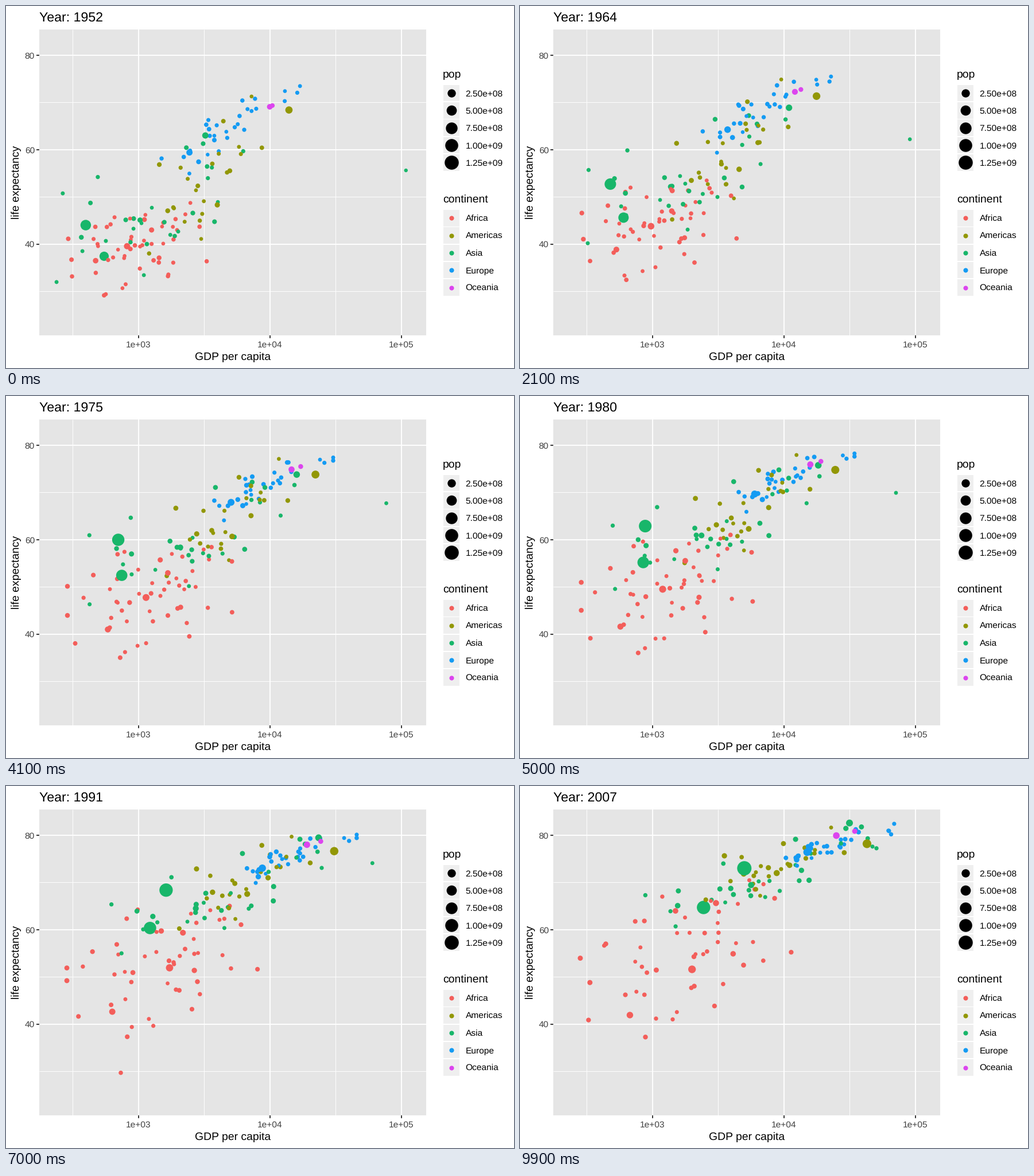
Recreate the animation shown at these times as a matplotlib script. Size 885 by 632 pixels, loop 10000 ms.

```python
import numpy as np
import matplotlib.pyplot as plt
from matplotlib.animation import FuncAnimation
from matplotlib.patches import Rectangle

W, H, DPI = 885, 632, 100
FRAMES, STEPS = 100, 11
PT = W / 504  # pixels per typographic point
LEFT, RIGHT, TOP, BOTTOM = 58, 732, 40.5, 575

plt.rcParams["font.family"] = "Liberation Sans"
plt.rcParams["text.hinting"] = "none"

COLORS = {"Africa": "#F35E5A", "Americas": "#929705", "Asia": "#18B66A",
          "Europe": "#149BF3", "Oceania": "#DC45EE"}

rng = np.random.default_rng(7)
T = np.linspace(0, 1, STEPS + 1)[:, None]  # one row per five years
EASED = 1 - (1 - T) ** 1.5                 # life gains slow down


def lerp(ends, t=T):
    return ends[0] + (ends[1] - ends[0]) * t


def px(logx):
    return 230.5 + 229 * (logx - 3)


def py(life):
    return 86 + 8.2375 * (80 - life)


def scale(pop):
    """Bubble size, its area growing with population in millions."""
    return 1 + 5 * np.sqrt(np.clip(pop / 1319, 0, 1))


def area(size):
    diameter = (0.75 * (size * 2.845 + 0.945) + 0.7) * PT
    return (diameter * 72 / DPI) ** 2


def normal(a):
    return (a - a.mean(axis=-1, keepdims=True)) / a.std(axis=-1, keepdims=True)


def walk(n):
    """Standardised scores for n bubbles that wander slowly from step to step."""
    moves = rng.normal(0, 0.1, (STEPS + 1, n))
    moves[0] = normal(rng.normal(size=n))
    return np.clip(normal(moves.cumsum(axis=0)), -1.9, 2)


def cap(life):
    """Bend the richest lives smoothly under a rising ceiling."""
    return life - 1.5 * np.logaddexp(0, (life - lerp((73.5, 83))) / 1.5)


def cloud(name, n, income, spread, life, slope, noise):
    """Bubbles scattered around a moving line; each pair is first and last year."""
    dx = lerp(spread) * walk(n)
    y = lerp(life, EASED) + lerp(slope) * dx + lerp(noise) * walk(n)
    pop = np.clip(10 ** rng.normal(1, 0.5, n), 0.4, 190) * lerp((0.43, 1))
    return lerp(income) + dx, cap(y), pop, [COLORS[name]] * n


def bubble(name, pop, income, life, bend=1, shock=0):
    """One standout; bend shapes the income path, shock is a brief loss of life."""
    dip = shock * np.maximum(0, 1 - abs(T - 8 / STEPS) * STEPS)
    return (lerp(income, T ** bend), lerp(life, EASED) - dip, lerp(pop),
            [COLORS[name]])


parts = [
    cloud("Africa", 51, (2.98, 3.25), (.27, .42), (39.3, 55), (6, 11), (4.6, 7.6)),
    cloud("Americas", 24, (3.5, 3.92), (.22, .27), (53, 73.4), (24, 9), (6, 2.8)),
    cloud("Asia", 29, (3.1, 3.84), (.38, .47), (46.5, 71), (13, 10), (6.5, 3)),
    cloud("Europe", 30, (3.69, 4.36), (.27, .24), (65, 77.9), (17, 8), (2.6, 1.2)),
    cloud("Oceania", 2, (4.01, 4.47), (.01, .07), (69.3, 80.7), (14, 8), (0, 0)),
    bubble("Asia", (556, 1319), (2.6, 3.7), (44, 73), bend=1.7),
    bubble("Asia", (372, 1110), (2.74, 3.39), (37.4, 64.7), bend=1.8),
    bubble("Americas", (157, 301), (4.146, 4.633), (68.4, 78.2)),
    bubble("Asia", (86, 127), (3.51, 4.5), (63, 82.6), bend=0.4),
    bubble("Asia", (0.2, 2.5), (5.036, 4.675), (55.6, 77.6)),
    bubble("Africa", (2.5, 8.9), (2.69, 2.94), (40, 46.2), shock=20),
]
X, Y, POP, hues = (np.concatenate(cols, axis=-1) for cols in zip(*parts))
order = rng.permutation(len(hues))
X, Y, POP, hues = px(X[:, order]), py(Y[:, order]), POP[:, order], hues[order]

fig = plt.figure(figsize=(W / DPI, H / DPI), dpi=DPI, facecolor="white")
ax = fig.add_axes([0, 0, 1, 1])
ax.set(xlim=(0, W), ylim=(H, 0))
ax.axis("off")


def text(x, y, s, pt=8.8, color="black", ha="left", **kw):
    return ax.text(x, y, s, fontsize=pt * PT * 72 / DPI, color=color, ha=ha,
                   va="baseline", **kw)


def line(xs, ys, width, color="white"):
    ax.plot(xs, ys, color=color, lw=width * 72 / DPI,
            solid_capstyle="butt", zorder=2)


def box(x, y, w, h, color):
    ax.add_patch(Rectangle((x, y), w, h, fc=color, lw=0, zorder=1))


def legend(title, base, first, rows):
    text(761, base, title, 11)
    for k, (label, color, size) in enumerate(rows):
        y = first + 30.33 * k
        box(762, y - 14.2, 28.4, 28.4, "#EFEFEF")
        ax.scatter([776], [y], s=area(size), c=color, lw=0, zorder=3)
        text(800.5, y + 5.5, label)


box(LEFT, TOP, RIGHT - LEFT, BOTTOM - TOP, "#E5E5E5")
for v in (2.5, 3.5, 4.5):
    line([px(v)] * 2, [TOP, BOTTOM], 0.94)
for v in (30, 50, 70):
    line([LEFT, RIGHT], [py(v)] * 2, 0.94)
for v in (3, 4, 5):
    line([px(v)] * 2, [TOP, BOTTOM], 1.88)
    line([px(v)] * 2, [BOTTOM, BOTTOM + 4.8], 1.88, "#333333")
    text(px(v), 595.5, f"1e+0{v}", color="#404040", ha="center")
for v in (40, 60, 80):
    line([LEFT, RIGHT], [py(v)] * 2, 1.88)
    line([LEFT - 4.8, LEFT], [py(v)] * 2, 1.88, "#333333")
    text(50, py(v) + 5.7, str(v), color="#404040", ha="right")

text(395.3, 618, "GDP per capita", 11, ha="center")
text(23, 308, "life expectancy", 11, ha="center", rotation=90,
     rotation_mode="anchor")
legend("pop", 125, 152, [(f"{p * 1e6:.2e}", "black", scale(p))
                         for p in range(250, 1251, 250)])
legend("continent", 343, 370.3, [(name, c, 1.5) for name, c in COLORS.items()])

title = text(58, 26.5, "", 13.2)
dots = ax.scatter(X[0], Y[0], s=area(scale(POP[0])), c=hues, lw=0, zorder=4)


def update(i):
    pos = STEPS * i / (FRAMES - 1)
    k = min(int(pos), STEPS - 1)
    x, y, pop = (lerp(a[k:k + 2], pos - k) for a in (X, Y, POP))
    dots.set_offsets(np.column_stack([x, y]))
    dots.set_sizes(area(scale(pop)))
    title.set_text(f"Year: {1952 + 5 * pos:.0f}")
    return dots, title


anim = FuncAnimation(fig, update, frames=FRAMES, interval=100, repeat=True,
                     repeat_delay=0, blit=False)
plt.show()
```
